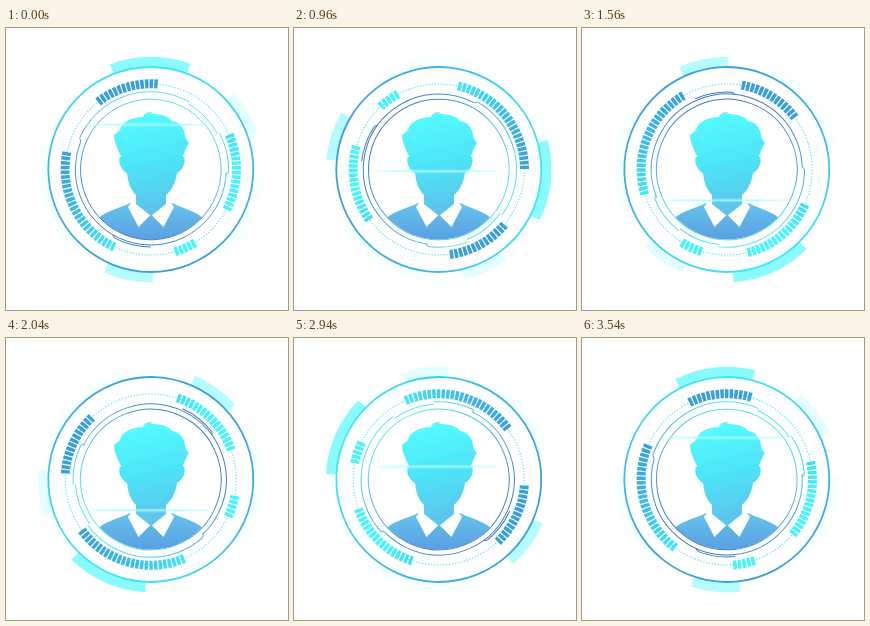
An HTML page with a canvas for the animation above (3600 ms loop, 282 px wide and 282 px high).

```html
<!DOCTYPE html>
<html lang="en">
<head>
<meta charset="utf-8">
<title>Face scan</title>
<style>
html, body { margin: 0; width: 100%; height: 100%; overflow: hidden; background: #fff; }
canvas { display: block; width: 282px; height: 282px; }
</style>
</head>
<body>
<canvas id="stage"></canvas>
<script>
const SIZE = 282, LOOP = 3600, STEP = 60;
const CX = 144.8, CY = 141.5;
const canvas = document.getElementById('stage');
const ratio = window.devicePixelRatio || 1;
canvas.width = canvas.height = SIZE * ratio;
const ctx = canvas.getContext('2d');

// Angles are in degrees, clockwise from the top.
const rad = deg => (deg - 90) * Math.PI / 180;

function gradient(x0, y0, x1, y1, ...colors) {
  const g = ctx.createLinearGradient(x0, y0, x1, y1);
  colors.forEach((c, i) => g.addColorStop(i / (colors.length - 1), c));
  return g;
}

function arc(radius, from, to, width, style) {
  ctx.beginPath();
  ctx.arc(0, 0, radius, rad(from), rad(to));
  ctx.lineWidth = width;
  ctx.strokeStyle = style;
  ctx.stroke();
}

function rotated(deg, draw) {
  ctx.save();
  ctx.translate(CX, CY);
  ctx.rotate(deg * Math.PI / 180);
  draw();
  ctx.restore();
}

function outerRing() {
  const block = (from, to, alpha) => arc(107.8, from, to, 10, `rgba(130,251,255,${alpha})`);
  block(-21.2, 20.6, 0.94);
  block(179, 204.5, 0.6);
  block(47, 71, 0.22);
  block(94, 142, 0.06);
  block(227, 282, 0.06);
  arc(102.5, 0, 360, 1.8, gradient(0, -102, 0, 102, '#3fe6f5', '#38b8e8', '#3a9fdc'));
}

function ticks() {
  ctx.setLineDash([1.4, 1.6]);
  arc(85.5, 0, 360, 1.2, '#66e8f2');
  ctx.setLineDash([]);
  const style = gradient(-45, -54, 32, 38, '#3a9ed9', '#40bfe8', '#48f3fb');
  const groups = [[322, 14], [66, 17], [149, 5], [205, 25]];
  for (const [start, count] of groups) {
    for (let i = 0; i < count; i++) {
      const a = start + i * 3.1;
      arc(85.7, a, a + 2.3, 9, style);
    }
  }
}

function notchedArc(radius, from, to, notch, style) {
  const point = (r, a) => [r * Math.cos(rad(a)), r * Math.sin(rad(a))];
  arc(radius, from, to, 1, style);
  ctx.beginPath();
  ctx.moveTo(...point(radius, notch));
  ctx.lineTo(...point(75.5, notch + (notch === from ? -2 : 2)));
  ctx.stroke();
}

function innerRing() {
  const style = gradient(45, -60, -28, 70, '#5ae8f4', '#4ba9e0', '#3c78c6');
  arc(70.3, 0, 360, 1, style);
  arc(75.5, 92, 292, 1, style);
  arc(75.5, 30, 62, 1, style);
  notchedArc(77.8, 294, 390, 294, style);
  notchedArc(77.8, 62, 92, 92, style);
  notchedArc(77.5, 180, 208, 208, style);
}

function polygon(...points) {
  ctx.beginPath();
  points.forEach(p => ctx.lineTo(...p));
  ctx.closePath();
  ctx.fill();
}

function body() {
  ctx.save();
  ctx.beginPath();
  ctx.arc(CX, CY, 70, 0, 7);
  ctx.clip();
  ctx.fillStyle = gradient(0, 174, 0, 212, '#66c4ec', '#5a9fe2');
  ctx.fill(new Path2D('M88 196C94 184 110 182 124 175L166 175C180 182 195 184 202 196L202 216L88 216Z'));
  ctx.fillStyle = '#fff';
  polygon([127, 172], [122, 179], [132.5, 199], [145, 186.5], [157.5, 199], [168, 179], [163, 172]);
  ctx.restore();
}

const head = new Path2D(`M115 128C111 120 108 113 108 107L114 102
  C115 95 125 89 137 89C138 86 141 84 146 84L145 86
  C156 86 162 88 166 93C174 94 179 101 179 108C180 112 182 114 183 115
  C180 119 179 123 177 128C181 130 178 142 171 145
  C170 153 167 161 160 167L160 176L145 188L130 176L130 167
  C124 161 122 154 121 145C114 142 111 130 115 128Z`);

function face() {
  ctx.fillStyle = gradient(133, 84, 157, 190, '#54fdff', '#4de3f7', '#62bcea');
  ctx.fill(head);
}

function scanLine(y) {
  const clear = 'rgba(130,248,250,0)', glow = 'rgba(150,248,250,.65)';
  ctx.fillStyle = gradient(78, 0, 208, 0, clear, glow, glow, glow, clear);
  ctx.fillRect(78, y - 0.8, 130, 1.6);
  ctx.fillStyle = gradient(0, y - 3, 0, y + 3,
    'rgba(200,255,255,0)', 'rgba(200,255,255,.4)', 'rgba(200,255,255,0)');
  ctx.beginPath();
  ctx.ellipse(144, y, 60, 3, 0, 0, 7);
  ctx.fill();
}

function draw(time) {
  const t = Math.floor((time % LOOP) / STEP) * STEP;
  const turn = 360 * t / LOOP;
  ctx.setTransform(ratio, 0, 0, ratio, 0, 0);
  ctx.fillStyle = '#fff';
  ctx.fillRect(0, 0, SIZE, SIZE);
  rotated(turn, outerRing);
  rotated(-2 * turn, ticks);
  body();
  face();
  rotated(turn, innerRing);
  scanLine(96.7 + 0.0485 * Math.min(t, LOOP - t));
}

const start = performance.now();
function tick() {
  draw(performance.now() - start);
  requestAnimationFrame(tick);
}
tick();
</script>
</body>
</html>
```
